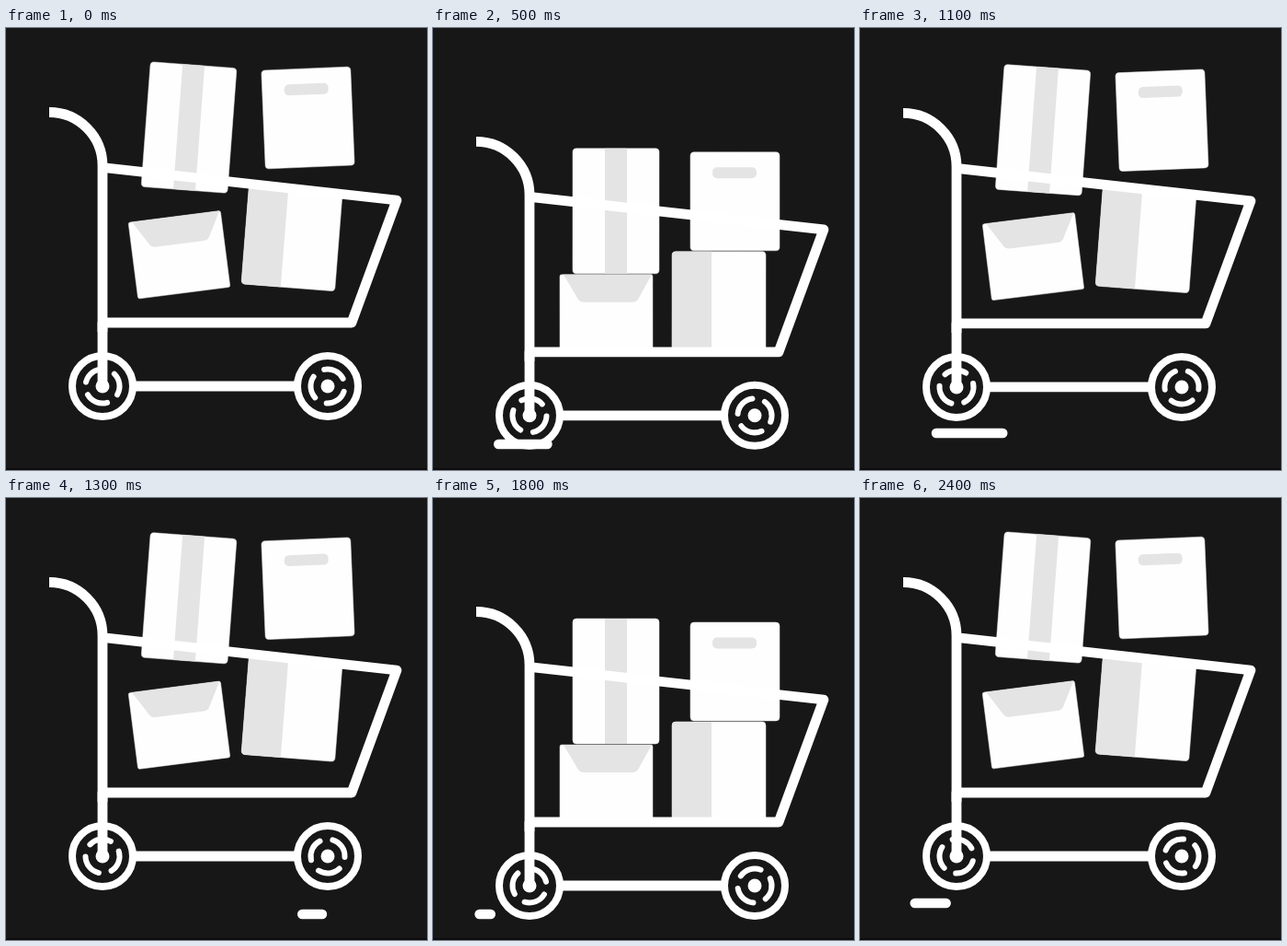
An HTML page that plays this animation: 458x480 px, repeating every 2.5 s.

```html
<!DOCTYPE html>
<html lang="en">
<head>
<meta charset="utf-8">
<title>Shopping cart</title>
<style>
  html, body { margin: 0; width: 100%; height: 100%; overflow: hidden; background: #171717; }
  svg { display: block; width: 458px; height: 480px; }
  .line { fill: none; stroke: #fff; stroke-width: 10.8; stroke-linejoin: round; }
  .round { stroke-linecap: round; }
  .streak { stroke-width: 10.4; }
  .box { fill: #fefefe; stroke: #ededed; stroke-width: .5; }
  .shade { fill: #e4e4e4; }
  .rim { fill: #171717; stroke: #fff; stroke-width: 8; }
  .spokes { fill: none; stroke: #fff; stroke-width: 6; stroke-linecap: round; }
</style>
</head>
<body>
<svg viewBox="0 0 458 480">
  <defs>
    <g id="spokes" class="spokes">
      <path id="arc" d="M14.6 -11.4A18.5 18.5 0 0 1 14.6 11.4"/>
      <use href="#arc" transform="rotate(120)"/>
      <use href="#arc" transform="rotate(240)"/>
    </g>
  </defs>
  <rect width="458" height="480" fill="#171717"/>
  <rect y="478" width="458" height="2" fill="#0f0b0d"/>

  <g id="cart">
    <!-- data: centre x, centre y, lift, tilt -->
    <g class="parcel" data-pose="188.5 278 31.5 -7.3">
      <rect class="box" x="138" y="236" width="101" height="83.5" rx="2"/>
      <path class="shade" d="M142 236H238L223 263Q221 266 217 266H164Q160 266 158 263Z"/>
    </g>
    <g class="parcel" data-pose="311 265.5 37 4.5">
      <rect class="box" x="260" y="211" width="102" height="108" rx="4"/>
      <path class="shade" d="M303 211H264Q260 211 260 215V315Q260 319 264 319H303Z"/>
    </g>
    <g class="parcel" data-pose="199 167.5 59 4.3">
      <rect class="box" x="152" y="99" width="94" height="136" rx="4"/>
      <rect class="shade" x="187" y="99" width="24" height="136"/>
    </g>
    <g class="parcel" data-pose="328.5 157 59 -2.4">
      <rect class="box" x="280" y="103" width="97" height="107" rx="4"/>
      <rect class="shade" x="304" y="119.5" width="48" height="12" rx="5"/>
    </g>

    <path class="line" d="M105 151.5L425 187L376 320H105M138 389H318"/>
    <g transform="translate(105 389)">
      <circle class="rim" r="33"/>
      <use class="spin" href="#spokes" data-start="-8"/>
      <circle r="7.5" fill="#fff"/>
    </g>
    <g transform="translate(350 389)">
      <circle class="rim" r="33"/>
      <use class="spin" href="#spokes" data-start="56"/>
      <circle r="7.5" fill="#fff"/>
    </g>
    <path class="line" d="M47 91.5A58 58 0 0 1 105 149.5V330"/>
    <path class="line round" d="M105 320V389"/>
  </g>

  <path class="line round streak"/>
  <path class="line round streak"/>
</svg>
<script>
  const LOOP = 2500, BOUNCE = 1250, TURN = 625, STEP = 100, DROP = 32;
  const START_X = 344, END_X = 50.5;

  const cart = document.getElementById("cart");
  const spins = document.querySelectorAll(".spin");
  const streaks = document.querySelectorAll(".streak");
  const parcels = [...document.querySelectorAll(".parcel")].map(el => ({
    el, pose: el.dataset.pose.split(" ").map(Number)
  }));

  const ramp = (a, b, t) => Math.min(1, Math.max(0, (t - a) / (b - a)));
  const smooth = (a, b, t) => (1 - Math.cos(Math.PI * ramp(a, b, t))) / 2;
  const along = k => START_X + (END_X - START_X) * k;

  function drawStreak(el, t, y) {
    const head = Math.pow(ramp(30, 545, t), 0.8);
    const tail = ramp(322, 560, t);
    const shown = head > 0 && tail < 1;
    el.setAttribute("d", shown ? `M${along(tail)} ${y}H${along(head)}` : "");
  }

  function draw(time) {
    const t = time % BOUNCE;
    const rise = smooth(700, 1150, t);
    const down = smooth(100, 520, t) - rise;
    const settled = smooth(20, 430, t) - rise;

    cart.setAttribute("transform", `translate(0 ${DROP * down})`);
    for (const { el, pose: [x, y, lift, tilt] } of parcels) {
      const dy = -lift * (1 - settled);
      el.setAttribute("transform",
        `translate(0 ${dy}) rotate(${tilt * (1 - down)} ${x} ${y})`);
    }
    for (const el of spins) {
      const angle = Number(el.dataset.start) + 360 * t / TURN;
      el.setAttribute("transform", `rotate(${angle})`);
    }

    drawStreak(streaks[0], t, 452);
    drawStreak(streaks[1], t - BOUNCE / 2, 440);
  }

  function tick() {
    const now = performance.now() % LOOP;
    draw(Math.floor(now / STEP) * STEP);
    requestAnimationFrame(tick);
  }
  tick();
</script>
</body>
</html>
```
